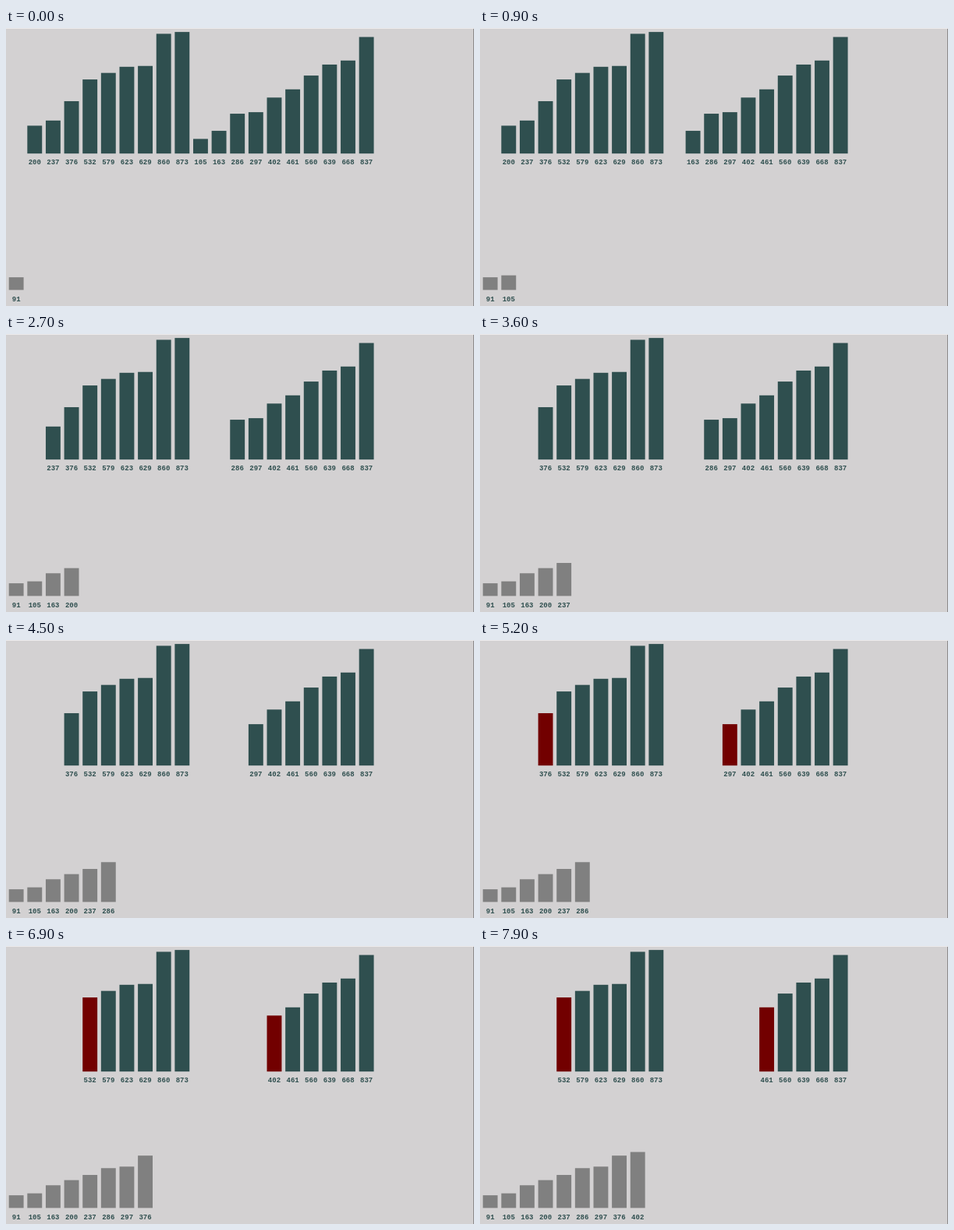
An HTML page for the animation above (8 s loop, 600 by 357 pixels).

```html
<!DOCTYPE html>
<html lang="en">
<head>
<meta charset="utf-8">
<title>Merge step</title>
<style>
  html, body { margin: 0; width: 100%; height: 100%; overflow: hidden; background: #d3d1d2; }
  svg { display: block; }
  text { font: bold 9px "Liberation Mono", "DejaVu Sans Mono", monospace; fill: #2f4f4f; text-anchor: middle; }
  rect { fill: #2f4f4f; }
  .compared rect { fill: #720000; }
  .merged rect { fill: #808080; }
</style>
</head>
<body>
<svg id="stage" width="600" height="357" viewBox="0 0 600 357">
  <path d="M0 .5H600" stroke="#eeeced"/>
  <path d="M599.5 1V357" stroke="#8c8a8b"/>
</svg>
<script>
const LOOP = 8000, CYCLE = 900, COMPARE_AT = 600;
const LEFT_X = 3.7, PITCH = 23.63, BAR_W = 18.9, UNIT = 0.1788;
const TOP_BASE = 161.2, LOW_BASE = 336.4, LABEL_DROP = 14.2;

const left = [91, 200, 237, 376, 532, 579, 623, 629, 860, 873];
const right = [105, 163, 286, 297, 402, 461, 560, 639, 668, 837];
const sorted = [...left, ...right].sort((a, b) => a - b);
const stage = document.getElementById("stage");

function add(parent, name, attrs) {
  const node = document.createElementNS("http://www.w3.org/2000/svg", name);
  for (const key in attrs) node.setAttribute(key, attrs[key]);
  return parent.appendChild(node);
}

const bars = [...left, ...right].map((value, slot) => {
  const group = add(stage, "g", {});
  const height = value * UNIT;
  add(group, "rect", { y: -height, width: BAR_W, height });
  add(group, "text", { x: BAR_W / 2, y: LABEL_DROP }).textContent = value;
  return { value, slot, group, rank: sorted.indexOf(value) };
});

function draw(time) {
  const mergedCount = 1 + Math.floor(time / CYCLE);
  const comparing = time % CYCLE >= COMPARE_AT;
  const waiting = value => sorted.indexOf(value) >= mergedCount;
  const heads = [left.find(waiting), right.find(waiting)];

  for (const { value, slot, group, rank } of bars) {
    const merged = rank < mergedCount;
    const x = LEFT_X + PITCH * (merged ? rank : slot);
    group.setAttribute("transform", `translate(${x} ${merged ? LOW_BASE : TOP_BASE})`);
    group.setAttribute("class", merged ? "merged" : comparing && heads.includes(value) ? "compared" : "");
  }
}

const start = performance.now();
function tick() {
  draw((performance.now() - start) % LOOP);
  requestAnimationFrame(tick);
}
tick();
</script>
</body>
</html>
```
